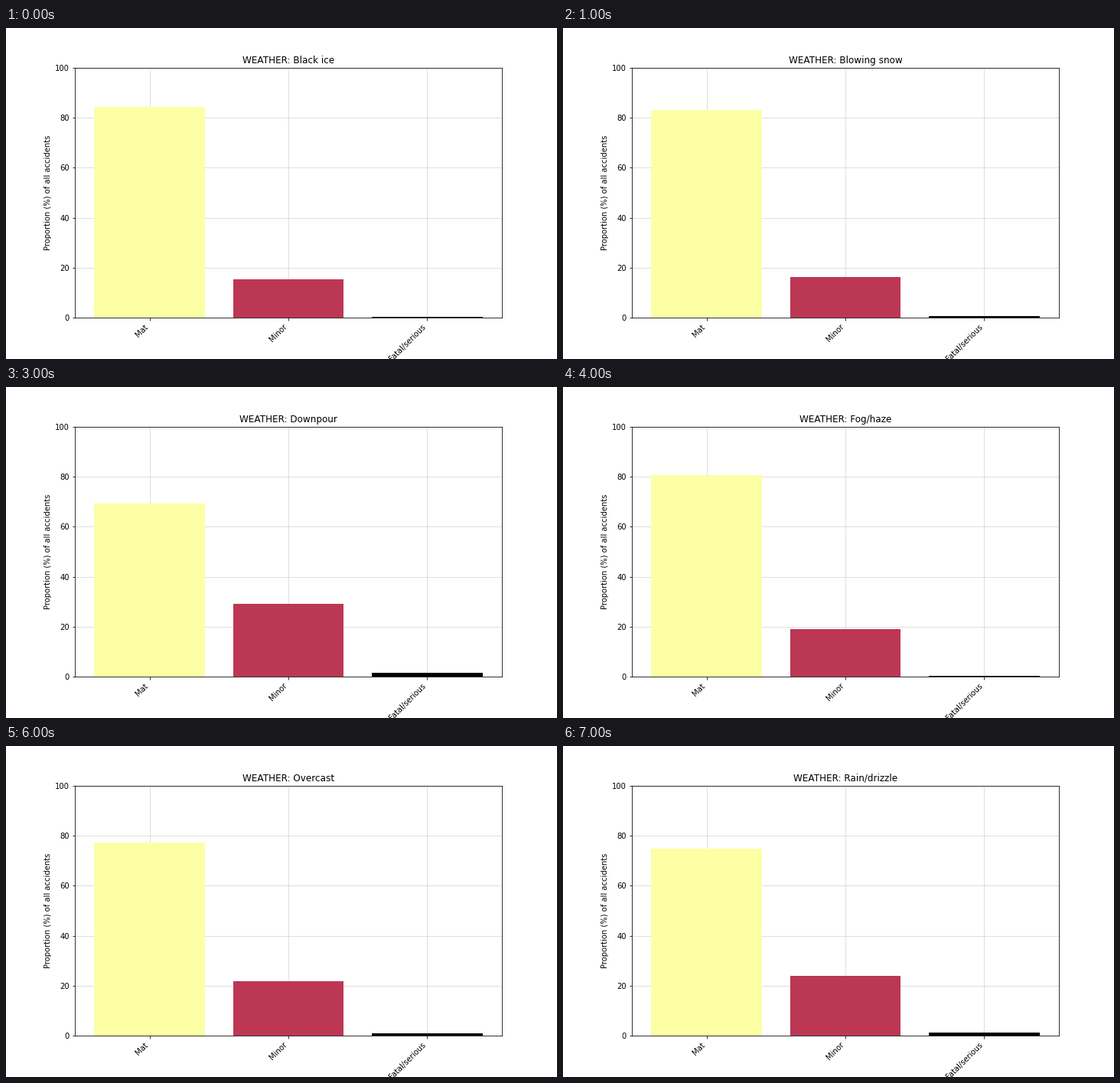
Animation, 720 px wide and 432 px high, one loop 8000 ms. Source, as a matplotlib script:

```python
import matplotlib.pyplot as plt
from matplotlib.animation import FuncAnimation

LABELS = ["Mat", "Minor", "Fatal/serious"]
COLORS = ["#fcffa4", "#bc3754", "#000004"]

# Share of accidents (%) by severity for each kind of weather
WEATHER = [
    ("Black ice", (84.3, 15.3, 0.4)),
    ("Blowing snow", (83.2, 16.2, 0.6)),
    ("Clear", (78.1, 20.9, 1.0)),
    ("Downpour", (69.3, 29.1, 1.6)),
    ("Fog/haze", (80.6, 19.0, 0.4)),
    ("Other", (94.4, 5.2, 0.4)),
    ("Overcast", (77.3, 21.7, 1.0)),
    ("Rain/drizzle", (74.8, 23.9, 1.3)),
]

plt.rcParams["font.family"] = "DejaVu Sans"
fig = plt.figure(figsize=(10, 6), dpi=72, facecolor="white")
ax = fig.add_axes([0.125, 0.125, 0.775, 0.755])

bars = ax.bar(range(3), WEATHER[0][1], width=0.8, color=COLORS)
ax.set_xlim(-0.54, 2.54)
ax.set_ylim(0, 100)
ax.set_xticks(range(3), LABELS, rotation=45, ha="right")
ax.set_ylabel("Proportion (%) of all accidents")
ax.set_axisbelow(True)
ax.grid(alpha=0.5)
title = ax.set_title("")


def draw(i):
    name, shares = WEATHER[i]
    title.set_text(f"WEATHER: {name}")
    for bar, share in zip(bars, shares):
        bar.set_height(share)
    return [title, *bars]


anim = FuncAnimation(fig, draw, frames=len(WEATHER), interval=1000,
                     repeat=True, repeat_delay=0)
plt.show()
```
